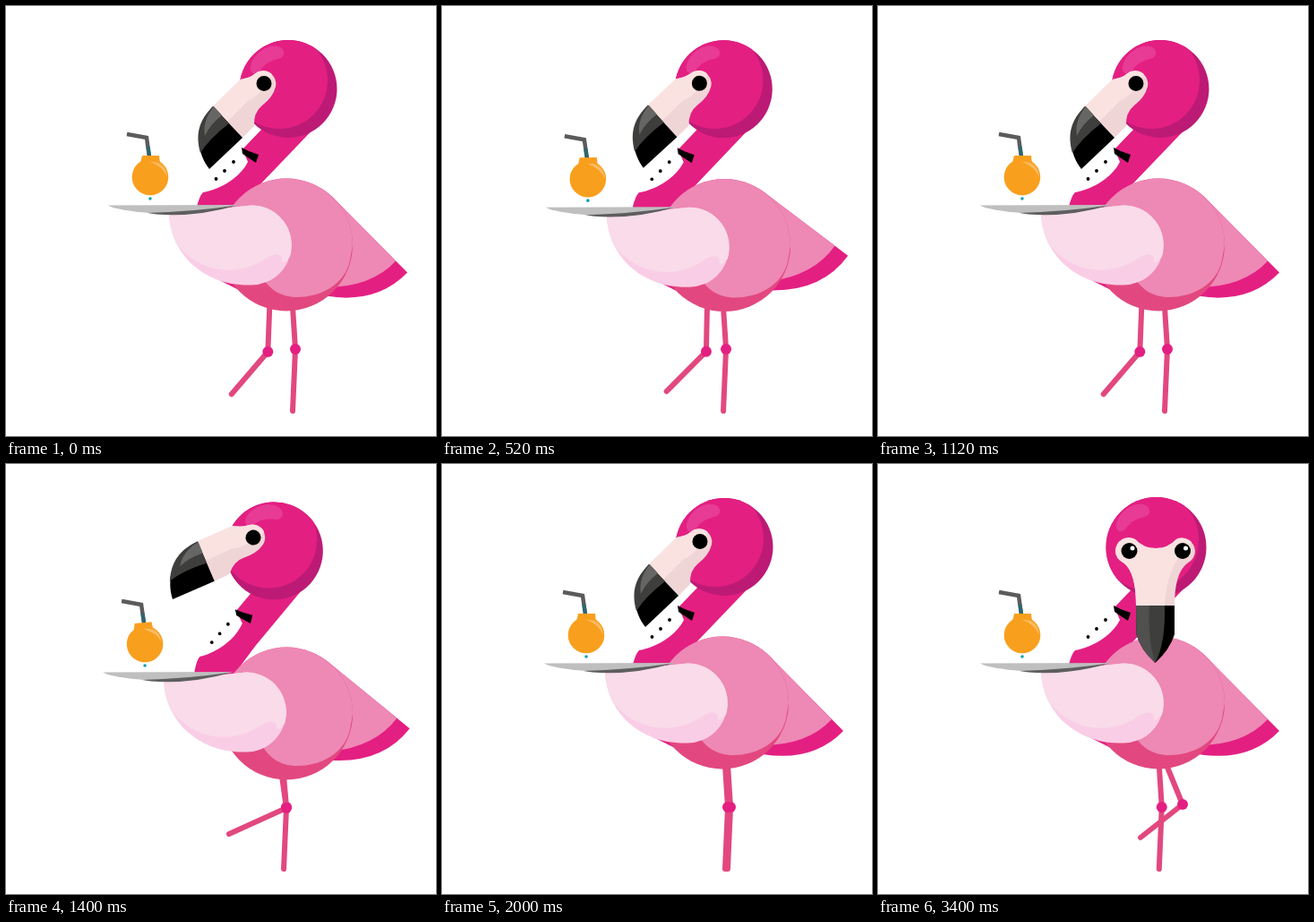
An HTML page that plays this animation: 480x480 px, repeating every 4 s.

```html
<!DOCTYPE html>
<html lang="en">
<head>
<meta charset="utf-8">
<title>Flamingo waiter</title>
<style>
  html, body { margin: 0; height: 100%; overflow: hidden; background: #fff; }
  svg { display: block; width: 100vw; height: 100vh; }
  .leg { fill: none; stroke: #e2487f; stroke-width: 6; stroke-linecap: round; stroke-linejoin: round; }
  .hot { fill: #e41f82; }
  .dark { fill: #bd1a75; }
  .soft { fill: #ee88b5; }
  .skin { fill: #fae2e1; }
  .shade { fill: #f0d5d6; }
  .coal { fill: #3e3e3c; }
  .grey { fill: #666664; }
  .shine { fill: #e73b95; }
</style>
</head>
<body>
<svg viewBox="0 0 480 480">
  <defs>
    <clipPath id="sideClip"><circle cx="315" cy="92.5" r="54.5"/></clipPath>
    <clipPath id="frontClip"><circle cx="310.5" cy="93" r="56"/></clipPath>
    <path id="shine" class="shine" d="M273 71C272 58 288 42 303 45C312 47 313 57 304 59C292 62 288 66 283 73C279 77 274 76 273 71Z"/>
  </defs>

  <g id="legs">
    <path class="leg"/><circle class="hot" r="6"/>
    <path class="leg"/><circle class="hot" r="6"/>
  </g>

  <g id="neck">
    <path class="hot" d="M352 128L283 200L259 228L262 318L236 305L213 224Q216 212 220 208C242 204 262 190 270 174L264 160L285 138L290 110Z"/>
    <path d="M263 158L271 162L282 166L279 175L270 169L264 165Z"/>
    <circle cx="234.5" cy="193" r="1.9"/><circle cx="244" cy="184" r="1.9"/><circle cx="254" cy="174" r="1.9"/>
  </g>

  <g id="body">
    <g id="tail">
      <path class="hot" d="M313 193Q348 194 370 219L448 298Q414 333 358 324L313 300Z"/>
      <path class="soft" d="M313 193Q348 194 370 219L435 285Q408 314 357 314L313 300Z"/>
    </g>
    <circle cx="313" cy="266.5" r="74" fill="#e2487f"/>
    <path class="soft" d="M239 266.5A74 74 0 0 1 387 266.5L384 284C378 312 350 325 325 325C306 325 292 315 285 300Z"/>
  </g>

  <g id="arm">
    <path fill="#facde6" d="M182 232L274 222.500A44.500 44.500 0 0 1 274 311.500C220 313 184 276 182 232Z"/>
    <path fill="#f9dbe9" d="M182 232L274 222.500A44.500 44.500 0 0 1 317 280Q306 292 308 280Q302 274 290 282C254 306 212 294 190 265Q183 250 182 232Z"/>
    <path fill="#bfbfbf" d="M114 222.500L260 222Q212 235 165 231.500Q122 228 114 222.500Z"/>
    <path fill="#5e5e5e" d="M158 231Q205 230 258 222.500Q212 236 168 232.500Z"/>
    <path d="M135 143L157 147L160 168" fill="none" stroke="#5b5b5b" stroke-width="4.500"/>
    <path d="M158.500 157L160.500 170" fill="none" stroke="#2c6670" stroke-width="4"/>
    <g id="drink">
      <circle cx="161" cy="191" r="20.300" fill="#f99f1e"/>
      <path fill="#f99f1e" d="M152 167H171L172 176H150Z"/>
      <path fill="#fcbc62" d="M161 174Q178 173 180 191Q175 179 161 174Z"/>
    </g>
    <circle cx="161" cy="215" r="1.800" fill="#16a0b4"/>
  </g>

  <g id="side">
    <circle class="dark" cx="315" cy="92.500" r="54.500"/>
    <circle class="hot" cx="305" cy="83" r="54" clip-path="url(#sideClip)"/>
    <use href="#shine"/>
    <path class="shade" d="M231 112L262 82Q273 80 278 75.500A14.500 14.500 0 0 1 301 90Q298 102 286 111Q276 119 277 134L264 147Z"/>
    <path class="skin" d="M231 112L262 82Q273 80 278 75.500A14.500 14.500 0 0 1 297 76Q285 100 270 106L247 129Z"/>
    <path d="M231 112L264 147L227 182C214 166 208 137 231 112Z"/>
    <path class="coal" d="M231 112L249 131Q227 148 217 164C211 142 216 127 231 112Z"/>
    <path class="grey" d="M232 112L241 122Q228 132 222 145Q219 128 232 112Z"/>
    <circle cx="288" cy="86.500" r="8.500"/>
  </g>

  <g id="front">
    <circle class="dark" cx="310.500" cy="93" r="56"/>
    <circle class="hot" cx="302" cy="85" r="56" clip-path="url(#frontClip)"/>
    <use href="#shine" x="-7"/>
    <g id="face">
      <path class="shade" d="M265 97A15 15 0 0 1 287 84Q296 94 310 94Q324 94 333 84A15 15 0 0 1 354 97Q354 106 345 111Q331 122 331 158H288Q288 122 275 111Q265 106 265 97Z"/>
      <path class="skin" d="M265 97A15 15 0 0 1 287 84Q296 94 310 94Q324 94 333 84A15 15 0 0 1 350 87Q322 112 320 158H288Q288 122 275 111Q265 106 265 97Z"/>
      <path d="M288 158H331V190Q326 207 309.500 222Q293 207 288.500 190Z"/>
      <path class="coal" d="M288 158H320Q321 200 309.500 222Q293 207 288.500 190Z"/>
      <path fill="#50504e" d="M288 158H303Q301 198 309.500 222Q293 207 288.500 190Z"/>
      <circle cx="280.500" cy="97" r="9"/><circle cx="284" cy="94" r="2.500" fill="#fff"/>
      <g id="wink"><circle cx="340" cy="97" r="9"/><circle cx="343.500" cy="94" r="2.500" fill="#fff"/></g>
    </g>
  </g>
</svg>
<script>
const LOOP = 4000, STEP = 560, WALK_END = 3 * STEP, TURN = 2360;

// leg poses: hip x, knee x, knee y, foot x, foot y
const stand = x => [x, x + 3, 383, x, 452];
const OUT = [294, 292, 386, 251, 433];
const LIFT = [322, 340, 380, 293, 417];
const TUCK = [308, 313, 384, 249, 413];
// each leg plants, stands, lifts and swings out again over two steps
const GAIT = [
  [0, OUT], [.15, stand(316)], [.5, stand(310)], [.93, stand(314)], [1, stand(320)],
  [1.15, stand(319)], [1.28, LIFT], [1.5, TUCK], [2, OUT]
];

const el = id => document.getElementById(id);
const clamp = v => Math.min(1, Math.max(0, v));
const put = (id, transform) => el(id).setAttribute("transform", transform);
const show = (id, on) => el(id).setAttribute("display", on ? "inline" : "none");

function legPose(u) {
  const i = Math.max(1, GAIT.findIndex(key => key[0] >= u));
  const [t0, a] = GAIT[i - 1], [t1, b] = GAIT[i];
  return a.map((v, j) => v + (b[j] - v) * (u - t0) / (t1 - t0));
}

function walkPhase(t) {
  if (t < WALK_END) return t / STEP;
  return 3 + .15 * clamp((t - WALK_END) / 320) + .13 * clamp((t - 2000) / 520);
}

function drawLegs(u, hipY) {
  const parts = el("legs").children;
  for (let i = 0; i < 2; i++) {
    const [hip, kx, ky, fx, fy] = legPose((u + i) % 2);
    parts[2 * i].setAttribute("d", `M${hip} ${hipY}L${kx} ${ky}L${fx} ${fy}`);
    parts[2 * i + 1].setAttribute("transform", `translate(${kx} ${ky})`);
  }
}

function draw(t) {
  const u = walkPhase(t);
  const p = t < WALK_END ? u % 1 : 0;
  const dip = (1 - Math.cos(p * 2 * Math.PI)) / 2;
  const sway = -Math.sin(p * 2 * Math.PI);
  // the tail flaps twice per step
  const flap = p < .57 ? p / .57 : (p - .57) / .43;

  drawLegs(u, 336 + 12 * dip);
  put("neck", `translate(${-5 * dip} ${5 * dip}) rotate(${-4 * dip} 250 190)`);
  put("body", `translate(${5 * sway} ${12 * dip})`);
  put("tail", `rotate(${-17 * Math.sin(flap * Math.PI)} 313 267)`);
  put("arm", `translate(${5 * sway - 6 * dip} ${4 * sway + 10 * dip})`);
  put("drink", `rotate(${-6 * dip} 161 191)`);
  put("side", `translate(${-15.5 * dip} ${4.5 * dip}) rotate(${20 * dip} 315 92)`);

  show("side", t < TURN);
  show("front", t >= TURN);
  const turn = 1 - clamp((t - TURN) / 160);
  put("face", `translate(${-18 * turn * turn} 0)`);

  const open = 1 - .92 * clamp((t - 3040) / 160) * clamp((3400 - t) / 120);
  put("wink", `translate(0 ${97 * (1 - open)}) scale(1 ${open})`);
}

const start = performance.now();
function tick() {
  draw((performance.now() - start) % LOOP);
  requestAnimationFrame(tick);
}
tick();
</script>
</body>
</html>
```
